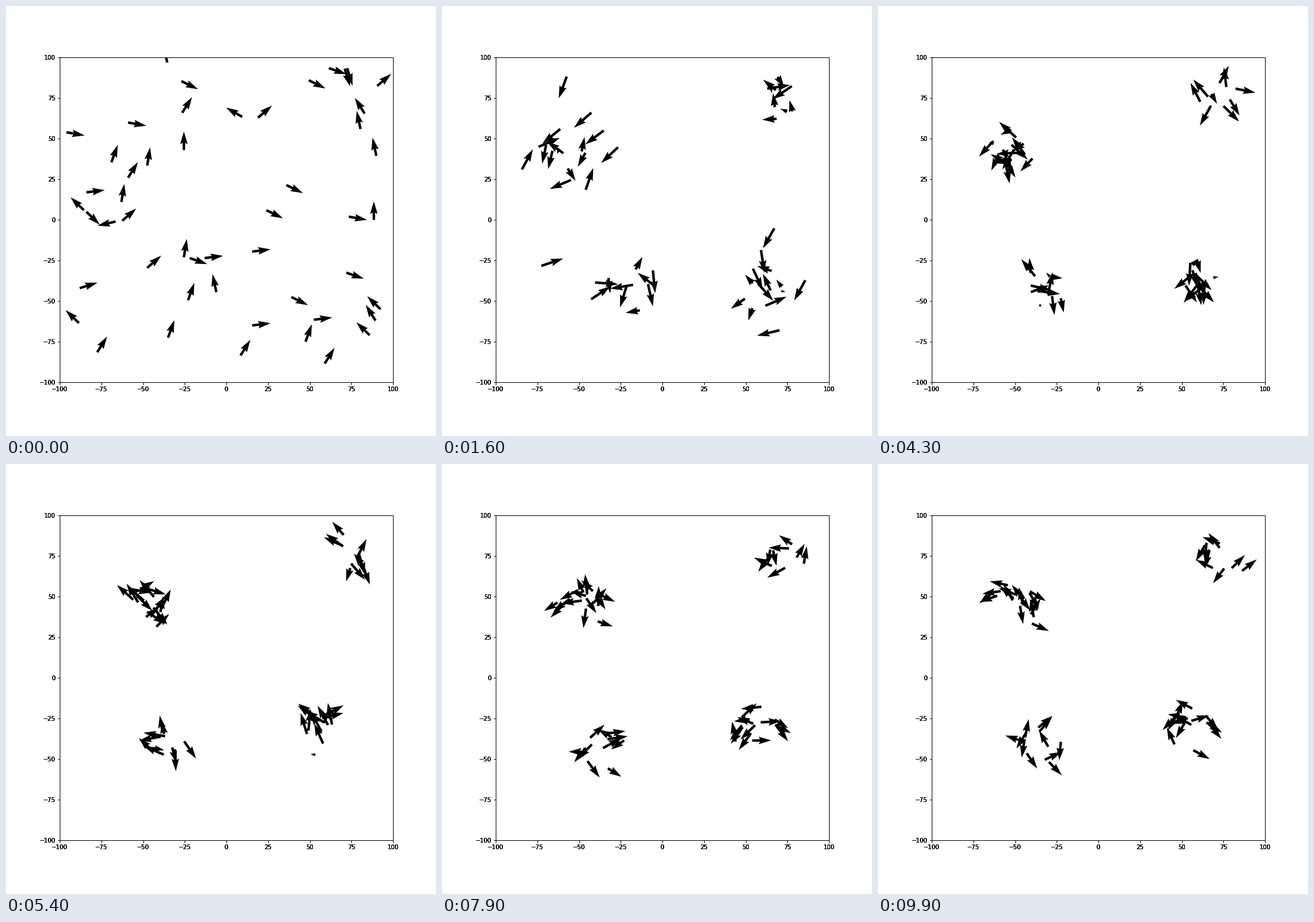
A matplotlib script that plays this animation: 720x720 px, repeating every 10 s.

```python
import numpy as np
import matplotlib.pyplot as plt
from matplotlib.animation import FuncAnimation

FRAMES, INTERVAL = 100, 100
TOP_SPEED = 3.0
PULL = 0.1

# heading in degrees -> starting points
START = {
    -73: [(72.5, 93.5), (71, 93.2)],
    -44: [(-84, 5)],
    -26: [(-27, 85.5), (49.5, 86), (36, 21.5), (24, 6), (39, -47.5)],
    -19: [(-22, -23.5), (61.5, 93.5), (72, -32.5)],
    -10: [(-96, 54), (-59, 60), (73.5, 2)],
    7: [(-84, 17), (-13, -23.5), (15.5, -19.5), (15.5, -65), (52.5, -61.5)],
    17: [(-88, -42)],
    41: [(-62.5, -0.5), (-47.5, -29.5), (90.5, 82.5), (19, 63)],
    58: [(-59, 26), (-77.5, -81.5), (8.5, -83.5), (59, -88.5), (-26.5, 66)],
    70: [(-69, 35.5), (-35, -72.5), (-23, -49.5), (47.5, -75)],
    81: [(-63, 11), (-47.5, 33.5), (-25.5, -23)],
    90: [(-25.5, 43), (88.5, 0)],
    102: [(-6, -44.5), (-35.5, 97), (80.5, 56), (90, 39.5)],
    122: [(83, 65.5), (89.5, -62)],
    136: [(-85.5, 6), (-88.5, -63.5), (86, -71), (92.5, -55)],
    150: [(9.5, 63.5)],
    193: [(-66.5, -1)],
}
EARLY = np.array([(-58, 36), (-18, -38), (60, -50), (72, 77)])
LATE = np.array([(-50, 43), (-34, -40), (56, -33), (74, 77)])


def ramp(t, start, end):
    return float(np.clip((t - start) / (end - start), 0, 1))


def unit(degrees):
    a = np.radians(degrees)
    return np.stack([np.cos(a), np.sin(a)], axis=-1)


def size(vec):
    return np.maximum(np.linalg.norm(vec, axis=1, keepdims=True), 1e-9)


def simulate():
    rng = np.random.default_rng(4)
    pos = np.array([p for group in START.values() for p in group], float)
    vel = TOP_SPEED * unit([h for h, group in START.items() for _ in group])
    n = len(pos)
    flock = np.linalg.norm(pos[:, None] - LATE, axis=2).argmin(axis=1)
    offset = unit(rng.uniform(0, 360, n)) * 6 * np.sqrt(rng.random((n, 1)))
    states = []
    for t in range(FRAMES):
        floor = TOP_SPEED * ramp(t, 58, 85)
        states.append((pos.copy(), vel * np.maximum(1, floor / size(vel))))

        centre = EARLY + (LATE - EARLY) * ramp(t, 14, 30)
        force = PULL * (centre[flock] + offset - pos)
        force *= np.minimum(1, (0.4 + 0.012 * t) / size(force))
        # each flock swings along a slowly turning axis
        axis = unit(-20 + 3.6 * (t - 54))
        swing = 0.25 * ramp(t, 35, 55) * np.sign(vel @ axis)
        vel = vel + force + swing[:, None] * axis
        vel *= np.minimum(1, TOP_SPEED / size(vel))
        pos = pos + vel
    return states


def make_axes(fig, **kw):
    ax = fig.add_axes([0.125, 0.125, 0.775, 0.755], **kw)
    ticks = np.arange(-100, 101, 25)
    ax.set(xlim=(-100, 100), ylim=(-100, 100), xticks=ticks, yticks=ticks)
    return ax


plt.rcParams.update({"font.family": "DejaVu Sans", "font.size": 10})
fig = plt.figure(figsize=(10, 10), dpi=72, facecolor="white")
ax = make_axes(fig)
# stacked copies give the heavy tick labels
for i in range(3):
    make_axes(fig, label=f"copy{i}").patch.set_visible(False)

states = simulate()
arrows = ax.quiver(*states[0][0].T, *states[0][1].T, color="black",
                   scale=18 * TOP_SPEED)


def draw(t):
    pos, vel = states[t]
    arrows.set_offsets(pos)
    arrows.scale = 18 * size(vel).mean()
    arrows.set_UVC(*vel.T)
    return [arrows]


anim = FuncAnimation(fig, draw, frames=FRAMES, interval=INTERVAL,
                     init_func=lambda: draw(0), repeat=True, repeat_delay=0)
plt.show()
```
